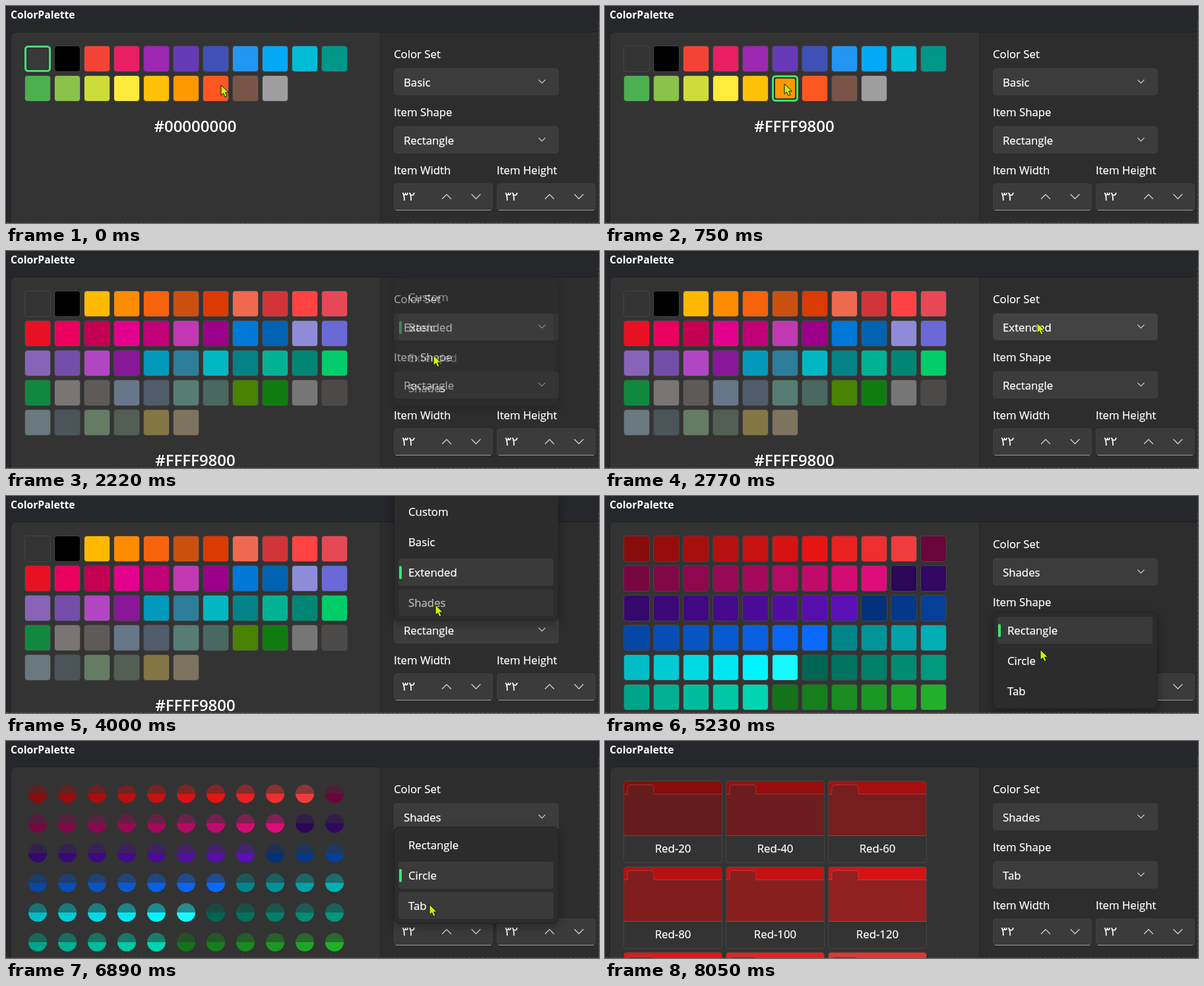
An HTML page that plays this animation: 899x329 px, repeating every 8450 ms.

```html
<!DOCTYPE html>
<html lang="en">
<head>
<meta charset="utf-8">
<title>ColorPalette</title>
<style>
  html, body { margin: 0; width: 100%; height: 100%; overflow: hidden; background: #26272a; }
  svg { display: block; color: #fff; font: 16.8px "Open Sans", "Noto Sans", "DejaVu Sans", sans-serif; }
  text { fill: currentColor; stroke: currentColor; stroke-width: .25; white-space: pre; }
  .title { font-size: 15.7px; font-weight: 700; stroke: none; }
  .hex { font-size: 24px; font-weight: 600; text-anchor: middle; stroke: none; }
  .mid { text-anchor: middle; }
  .num { font-family: "DejaVu Sans", sans-serif; font-size: 19px; stroke: none; }
  .pressed { color: #bbb; }
  .chev { fill: none; stroke: #d0d0d0; stroke-width: 1.3; stroke-linecap: round; stroke-linejoin: round; }
  .menu { fill: #2c2c2c; stroke: #222; filter: drop-shadow(0 5px 7px rgba(0, 0, 0, .3)); }
</style>
</head>
<body>
<svg id="stage" width="899" height="329" viewBox="0 0 899 329"></svg>
<script>
const LOOP = 8450, GREEN = '#3ae374', EDGE = 'stroke="#444"';
const stage = document.getElementById('stage');

// Bursts of motion: start, end, number of pictures
const bursts = [
  [200, 1030, 13], [1100, 1940, 13], [2010, 2080, 2], [2220, 2290, 2], [2490, 3320, 13],
  [3390, 3660, 5], [4000, 4130, 2], [4460, 4950, 8], [5090, 5440, 6], [5840, 6680, 12],
  [6750, 7170, 7], [7440, 7590, 3], [7910, 8050, 3]
];
const ticks = [0, ...bursts.flatMap(([a, b, n]) =>
  Array.from({ length: n }, (_, i) => a + Math.floor(i * (b - a) / (n - 1))))];

// Pointer path: time, x, y
const path = [
  [130, 326, 120], [480, 272, 118], [690, 272, 118], [1030, 530, 122], [1100, 545, 122],
  [1380, 651, 119], [1590, 651, 119], [2010, 648, 158], [2420, 648, 158], [2766, 655, 109],
  [3320, 655, 109], [3660, 651, 165], [4390, 651, 165], [4740, 660, 196], [5020, 660, 196],
  [5230, 660, 233], [5370, 658, 244], [5770, 658, 244], [6190, 655, 198], [6680, 655, 198],
  [6890, 642, 248], [7840, 642, 248], [8050, 622, 340]
];

const sets = ['Custom', 'Basic', 'Extended', 'Shades'];
const shapes = ['Rectangle', 'Circle', 'Tab'];
const menus = [
  { open: 1390, press: 2080, pick: 2220, gone: 2290, items: sets, from: 1, to: 2, y: 116 },
  { open: 2980, press: 4000, pick: 4130, gone: 4130, items: sets, from: 2, to: 3, y: 116 },
  { open: 4790, press: 5440, pick: 5840, gone: 5900, items: shapes, from: 0, to: 1, y: 204 },
  { open: 6390, press: 7440, pick: 7510, gone: 7580, items: shapes, from: 1, to: 2, y: 204 }
];

const hexList = s => s.split(' ').map(c => c === '-' ? 'none' : '#' + c);
const basic = hexList('- 000 F44336 E91E63 9C27B0 673AB7 3F51B5 2196F3 03A9F4 00BCD4 009688 ' +
  '4CAF50 8BC34A CDDC39 FFEB3B FFC107 FF9800 FF5722 795548 9E9E9E');
const extended = hexList('- 000 FFB900 FF8C00 F7630C CA5010 DA3B01 EF6950 D13438 FF4343 E74856 ' +
  'E81123 EA005E C30052 E3008C BF0077 C239B3 9A0089 0078D7 0063B1 8E8CD8 6B69D6 ' +
  '8764B8 744DA9 B146C2 881798 0099BC 2D7D9A 00B7C3 038387 00B294 018574 00CC6A ' +
  '10893E 7A7574 5D5A58 68768A 515C6B 567C73 486860 498205 107C10 767676 4C4A48 ' +
  '69797E 4A5459 647C64 525E54 847545 7E735F');

// Ten shades through three stops, the middle one at index `mid`
function ramp(a, b, c, mid) {
  const rgb = s => [0, 2, 4].map(i => parseInt(s.substr(i, 2), 16));
  return Array.from({ length: 10 }, (_, i) => {
    const [p, q, k] = i < mid ? [rgb(a), rgb(b), i / mid] : [rgb(b), rgb(c), (i - mid) / (9 - mid)];
    return `rgb(${p.map((v, j) => Math.round(v + (q[j] - v) * k))})`;
  });
}
const shades = [
  ...ramp('870c0c', 'e61414', 'f03c3c', 6), ...ramp('6a063a', 'a40a5c', 'de0c7a', 5),
  ...ramp('2c0658', '460a8c', '5b0fb6', 5), ...ramp('03317a', '0855c2', '0a6aff', 5),
  ...ramp('00868a', '00f4ff', '18f8ff', 8), ...ramp('006654', '00a488', '00d4b0', 5),
  ...ramp('14721a', '20b02a', '40c84a', 5)
].slice(0, 66);

const rect = (x, y, w, h, r, fill, more = '') =>
  `<rect x="${x}" y="${y}" width="${w}" height="${h}" rx="${r}" fill="${fill}" ${more}/>`;
const text = (x, y, s, cls = '', more = '') => `<text x="${x}" y="${y}" class="${cls}" ${more}>${s}</text>`;
const chevron = (x, y, w, dir) =>
  `<path class="chev" d="M${x - w} ${y - w * dir / 2}l${w} ${w * dir}l${w} ${-w * dir}"/>`;

function spinner(x, label) {
  return text(x, 255, label) +
    rect(x + .5, 269.5, 149, 40, 4, '#3b3b3b', 'stroke="#414141"') +
    `<path d="M${x + 3} 309.5h144" stroke="#9a9a9a"/>` +
    text(x + 12, 295, '٣٢', 'num', 'direction="ltr"') +
    chevron(x + 80, 289, 6.5, -1) + chevron(x + 124.5, 289, 6.5, 1);
}

function combo(y, label, hot) {
  return rect(588.5, y - 20.5, 249, 40, 4, hot ? '#434343' : '#3c3c3c', 'stroke="#424242"') +
    text(603, y + 6, label) + chevron(812.5, y - 1, 4.7, 1);
}

function swatch(x, y, color, selected) {
  if (!selected) return rect(x - .5, y - .5, 39, 39, 4, color, EDGE);
  return rect(x + .5, y + .5, 37, 37, 4, '#333', `stroke="${GREEN}" stroke-width="3"`) +
    rect(x + 4, y + 4, 30, 30, 2, color === 'none' ? '#393939' : color);
}

function dot(x, y, color) {
  return `<circle cx="${x}" cy="${y}" r="14" fill="${color}" opacity=".45"/>` +
    `<path d="M${x - 14} ${y}a14 14 0 0 0 28 0z" fill="${color}"/>`;
}

function folder(x, y, color, name) {
  const shape = `M${x} ${y + 20}h5.5v-10q0 -4 4 -4h32q4 0 4 4v10H${x + 149}v63h-149z`;
  return `<path d="M${x} ${y + 83.5}V${y + 4}q0 -4 4 -4h141q4 0 4 4v79.5z" fill="${color}"/>` +
    `<path d="${shape}" fill="#333" fill-opacity=".42" stroke="#fff" stroke-opacity=".15"/>` +
    rect(x, y, 149, 124, 4, 'none', EDGE) +
    text(x + 74.5, y + 108, name, 'mid');
}

function palette(set, shape, selected) {
  const colors = [, basic, extended, shades][set];
  if (shape === 2)
    return shades.slice(0, 9).map((c, i) =>
      folder(28.5 + 155 * (i % 3), 60.5 + 130 * Math.floor(i / 3), c, 'Red-' + (i + 1) * 20)).join('');
  return colors.map((c, i) => {
    const x = 29 + 45 * (i % 11), y = 61 + 45 * Math.floor(i / 11);
    return shape ? dot(x + 19, y + 19, c) : swatch(x, y, c, set === 1 && i === selected);
  }).join('');
}

// The menu unfolds from its chosen row; its shadow appears once it is fully open
function menu(m, t, px, py) {
  const top = m.y - 46 * m.from - 28, bottom = m.y + 46 * (m.items.length - 1 - m.from) + 27;
  const k = Math.min(1, (t - m.open) / 250), pad = k < 1 ? 0 : 30;
  const reach = Math.max(m.y - top, bottom - m.y) * (.33 + .67 * (1 - (1 - k) ** 3)) + pad;
  const rows = m.items.map((label, i) => {
    const y = m.y + 46 * (i - m.from);
    const pressed = t >= m.press && i === m.to;
    const lit = i === m.from || (Math.abs(py - y) < 16 && px > 595 && px < 830);
    return (pressed ? rect(595, y - 21, 235, 41, 4, '#333') : lit ? rect(595, y - 21, 235, 41, 4, '#3a3a3a') : '') +
      (i === m.from ? rect(596, y - 10, 4, 20, 2, GREEN) : '') +
      text(610, y + 6, label, pressed ? 'pressed' : '');
  }).join('');
  return `<clipPath id="fold">${rect(588 - pad, m.y - reach, 250 + 2 * pad, 2 * reach, 0, '#000')}</clipPath>` +
    `<g clip-path="url(#fold)" opacity="${t >= m.pick ? .45 : 1}">` +
    rect(588.5, top + .5, 249, bottom - top - 1, 8, '#2c2c2c', 'class="menu"') + rows + '</g>';
}

function pointerAt(t) {
  const i = path.findIndex(p => p[0] > t);
  if (i === 0) return path[0].slice(1);
  if (i < 0) return path[path.length - 1].slice(1);
  const [a, b] = [path[i - 1], path[i]];
  const k = (t - a[0]) / (b[0] - a[0]), e = k * k * (3 - 2 * k);
  return [a[1] + (b[1] - a[1]) * e, a[2] + (b[2] - a[2]) * e];
}

function pointer(x, y, resize) {
  const d = resize
    ? 'M0 -11l4.5 5.5h-3v11h3L0 11l-4.5 -5.5h3v-11h-3z'
    : 'M0 0V15.5L3.6 12.3L6 18L9 16.8L6.6 11.2H11.5z';
  return `<path transform="translate(${x} ${y})" d="${d}" fill="#c8f500" stroke="#111" stroke-linejoin="round"/>`;
}

function draw(t) {
  let set = 1, shape = 0;
  for (const m of menus) if (t >= m.pick) m.items === sets ? set = m.to : shape = m.to;
  const open = menus.find(m => t >= m.open && t < m.gone);
  const [px, py] = pointerAt(t);
  const hot = y => !open && px > 588 && px < 838 && Math.abs(py - y) < 20;
  const picked = t >= 610;

  stage.innerHTML =
    rect(0, 0, 899, 329, 0, '#26272a') +
    rect(7.5, 39.5, 920, 320, 8, '#2d2d2d', 'stroke="#202123"') +
    '<path d="M567 40H16q-8 0 -8 8v290h559z" fill="#333"/>' +
    '<path d="M567.5 40v289" stroke="#252525"/>' +
    '<path d="M898.5 25V329M0 328.5H899" stroke="#4a4545" stroke-dasharray="4 3"/>' +
    text(7, 19, 'ColorPalette', 'title') +
    palette(set, shape, picked ? 16 : 0) +
    (set < 3 ? text(287, set === 1 ? 191 : 326, picked ? '#FFFF9800' : '#00000000', 'hex') : '') +
    text(588, 79, 'Color Set') + combo(115.5, sets[set], hot(116)) +
    text(588, 167, 'Item Shape') + combo(203.5, shapes[shape], hot(204)) +
    spinner(588, 'Item Width') + spinner(744, 'Item Height') +
    (open ? menu(open, t, px, py) : '') +
    pointer(px, py, t >= 1390 && t < 1500);
}

let shown = -1;
function frame(now) {
  const t = now % LOOP;
  const tick = ticks.filter(v => v <= t).pop();
  if (tick !== shown) draw(shown = tick);
  requestAnimationFrame(frame);
}
frame(0);
</script>
</body>
</html>
```
